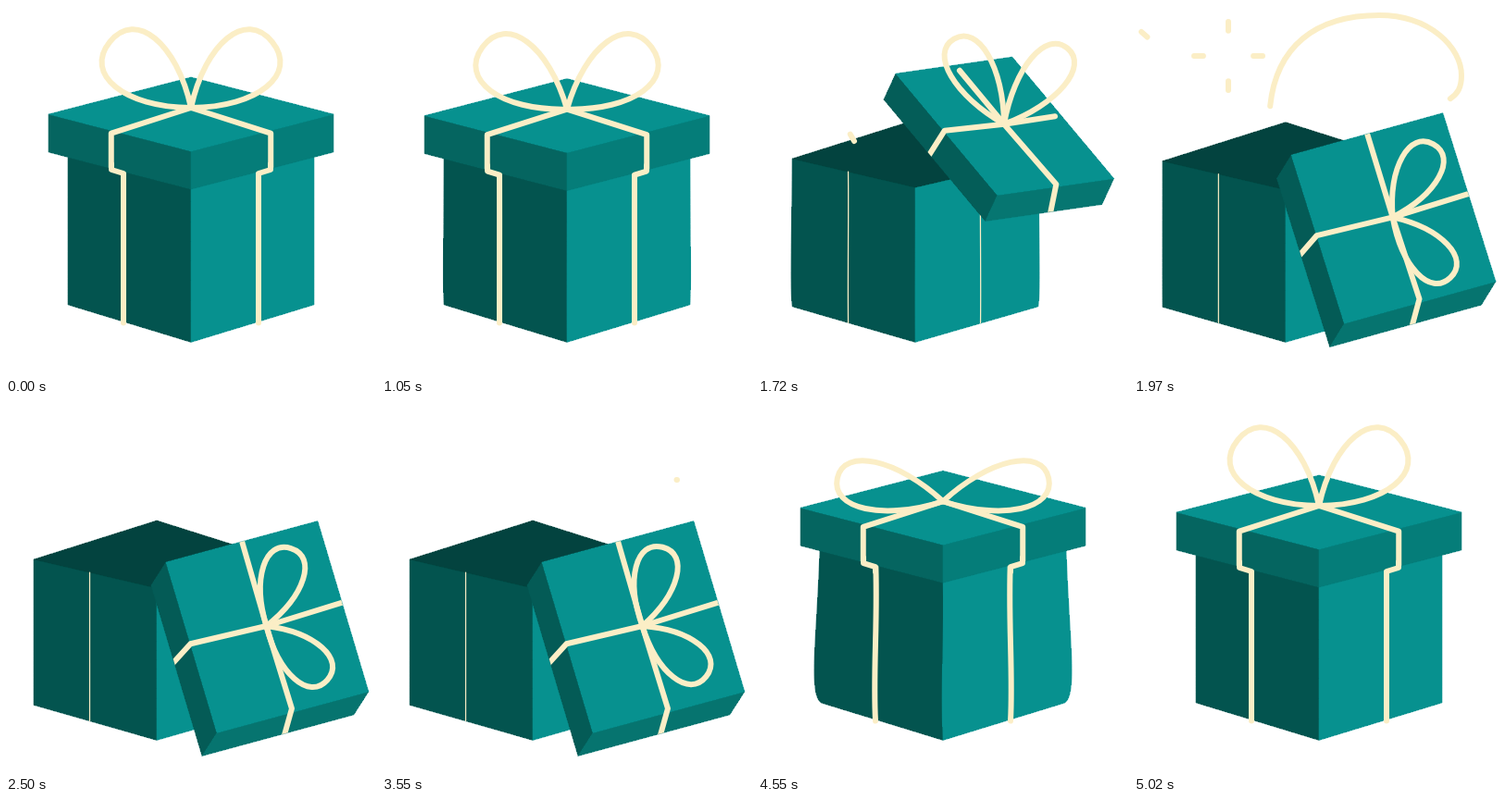
Write an HTML page that moves like this. It is 400x400 px and loops after 5.05 s.

```html
<!DOCTYPE html>
<html lang="en">
<head>
<meta charset="utf-8">
<title>Gift box</title>
<style>
html, body { margin: 0; width: 100%; height: 100%; overflow: hidden; background: #fff; }
svg { display: block; width: 100vw; height: 100vh; }
.line { fill: none; stroke: #fbeec6; stroke-width: 6; stroke-linecap: round; stroke-linejoin: round; }
.face { stroke-width: .6; stroke-linejoin: round; shape-rendering: crispEdges; }
</style>
</head>
<body>
<svg id="stage" viewBox="0 0 400 400">
  <defs><clipPath id="lidClip"><path id="lidShape"/></clipPath></defs>
</svg>
<script>
const LOOP = 5050, MIRROR = 6020;
const WINDUP = 1020, LAUNCH = 1525;
const stage = document.getElementById('stage');
const lidShape = document.getElementById('lidShape');

function add(cls, attrs = {}) {
  const el = document.createElementNS('http://www.w3.org/2000/svg', 'path');
  el.setAttribute('class', cls);
  for (const k in attrs) el.setAttribute(k, attrs[k]);
  stage.append(el);
  return el;
}
const face = color => {
  const el = add('face');
  paint(el, color);
  return el;
};
const paint = (el, color) => { el.style.fill = el.style.stroke = color; };
const draw = (el, d) => el.setAttribute('d', d);
const show = (el, on) => el.setAttribute('visibility', on ? 'visible' : 'hidden');
const open = (...pts) => 'M' + pts.join('L');
const poly = (...pts) => open(...pts) + 'Z';

const lerp = (a, b, k) => a + (b - a) * k;
const mix = (a, b, k) => a.map((v, i) => lerp(v, b[i], k));
const plus = (a, b) => a.map((v, i) => v + b[i]);
const minus = (a, b) => a.map((v, i) => v - b[i]);
const rgb = c => `rgb(${c.map(Math.round)})`;

const span = (t, a, b) => Math.min(1, Math.max(0, (t - a) / (b - a)));
const ease = (t, a, b) => (1 - Math.cos(Math.PI * span(t, a, b))) / 2;
// Rises from 0 at `from` towards 1; a higher power starts more slowly.
const settle = (t, from, tau, power = 1) =>
  1 - Math.exp(-((Math.max(0, t - from) / tau) ** power));

const bodyL = face('#03544f'), bodyR = face('#07918f'), inside = face('#03433f');
const bandL = add('line'), bandR = add('line');
const spark = add('line', { d: 'M104 146C75 95 45 60 8 28', pathLength: 1 });
const swirl = add('line', {
  d: 'M148 186C143 160 143 130 147 110C153 45 195 10 265 10C320 10 354 45 354 75' +
     'C354 90 349 96 339 102C325 110 308 105 308 93C308 85 313 82 319 82',
  pathLength: 1
});
const ring = add('line'), burst = add('line');
const lidL = face('#056560'), lidR = face('#057d79'), lidTop = face('#07918f');
const cross = add('line', { 'clip-path': 'url(#lidClip)' });
const joinL = add('line'), joinR = add('line');
const bowL = add('line'), bowR = add('line');

// Everything that drives the pose at time t.
function motion(t) {
  const wind = span(t, WINDUP, LAUNCH);
  const slide = settle(t, LAUNCH, 118);
  return {
    slide,
    bob: 5.5 * Math.sin(1.5 * Math.PI * wind),
    bulge: Math.sin(Math.PI / 2 * wind) * (1 - slide),
    slim: settle(t, LAUNCH, 45),
    turn: settle(t, LAUNCH, 237, 2.45),
    fall: settle(t, LAUNCH, 311, 2.45),
    hop: 20 * Math.sin(Math.PI * span(t, LAUNCH, 1820))
  };
}

function drawBody({ slide, bob, bulge, slim }) {
  const dx = -37 * slide, rim = (bob - 10) * (1 - slide);
  const left = 67 + dx, mid = 200 + dx, right = 333 + dx;
  const rimL = [left, 168 + rim], rimM = [mid, 199 + rim], rimR = [right, 168 + rim];
  const base = 323 + 2.5 * slide, foot = [mid, 363.5];
  const seam = `C${mid - 3 * bulge} 300 ${mid + 2 * bulge} 250 ${rimM}`;
  const wall = (x, out, top) =>
    `M${top}C${x + out * 3 * bulge} 250 ${x + out * 13 * bulge} 312 ` +
    `${x - out * bulge} ${base}L${foot}${seam}Z`;
  draw(bodyL, wall(left, -1, rimL));
  draw(bodyR, wall(right, 1, rimR));
  draw(inside, poly(rimL, [mid, 126 + rim], rimR, rimM));

  const top = 182 + rim, bend = 3 * bulge;
  const band = (el, x, out) => {
    draw(el, `M${x} ${top}C${x - out * bend} 230 ${x + out * bend} 290 ${x} 342.5`);
    el.style.strokeWidth = lerp(6, 1.2, slim);
  };
  band(bandL, 127 + dx + .5 * slim, -1);
  band(bandR, 273 + dx - 2.5 * slim, 1);
}

// A teardrop loop that starts and ends at the knot.
function drawLoop(el, knot, degrees, length, width) {
  const a = degrees * Math.PI / 180, c = Math.cos(a), s = Math.sin(a);
  const at = (x, y) => plus(knot, [x * c - y * s, x * s + y * c]);
  draw(el, `M${knot}C${at(length / 2, -width)} ${at(length, -width)} ${at(length, 0)}` +
    `C${at(length, width)} ${at(length / 2, width)} ${knot}`);
}

function drawBow(t, knot, { slide, bulge, fall }) {
  const since = Math.max(0, t - LAUNCH);
  const swing = -30 * fall * Math.exp(-since / 900) * Math.sin(2 * Math.PI * since / 630);
  const axis = -90 + 71.5 * settle(t, LAUNCH, 333, 3.4) + swing;
  const spread = 51 + 27 * bulge + 6 * slide - 44 * slide * (1 - fall);
  const length = 113 + 4 * bulge - 25 * fall;
  const width = 45 - 11 * bulge - 15 * slide;
  drawLoop(bowL, knot, axis - spread, length, width);
  drawLoop(bowR, knot, axis + spread, length, width);
}

function drawLid(t, m) {
  const { slide, bob, turn, fall, hop } = m;
  const centre = [200 + 82.5 * slide, 117 + bob + 129.5 * fall - hop];
  const across = mix([154, 0], [109.5, 70], slide);
  const down = [-54.5 * turn ** 2.5, 40 + 74.5 * turn];
  const side = mix([0, 41], [-16, 25], slide);
  const L = minus(centre, across), R = plus(centre, across);
  const B = minus(centre, down), F = plus(centre, down);
  const low = a => plus(a, side);
  draw(lidTop, poly(L, B, R, F));
  draw(lidL, poly(L, F, low(F), low(L)));
  draw(lidR, poly(F, R, low(R), low(F)));
  draw(lidShape, poly(L, B, R, low(R), low(F), low(L)));
  paint(lidL, rgb(mix([5, 101, 96], [4, 91, 86], slide)));
  paint(lidR, rgb(mix([5, 125, 121], [6, 116, 111], slide)));

  const knot = plus(centre, [-slide, lerp(-7, -1, slide)]);
  const split = lerp(.56, .5, slide);
  const shift = a => plus(a, [-slide, lerp(3, -4, slide)]);
  const mL = shift(mix(F, L, split)), mR = shift(mix(F, R, split));
  const endL = plus(mL, plus(side, [-4 * slide, -3 * slide]));
  const endR = plus(mR, plus(side, [9 * slide, 0]));
  const past = (a, b) => plus(b, minus(b, a));
  const rear = a => mix(knot, shift(a), slide * 1.08);
  draw(cross, open(past(mL, endL), mL, knot, mR, past(mR, endR)) +
    open(rear(mix(L, B, .5)), knot, rear(mix(B, R, .5))));

  const y = L[1] + 60;
  [[joinL, -1], [joinR, 1]].forEach(([el, out]) => {
    const [x1, x2] = [200 + 86 * out, 200 + 73 * out];
    show(el, t < LAUNCH + 15);
    draw(el, open([x1, y - 6], [x1, y], [x2, y + 4], [x2, y + 9]));
  });
  drawBow(t, knot, m);
}

function trim(el, tail, head, on) {
  show(el, on);
  const start = Math.min(tail, .999);
  el.setAttribute('stroke-dasharray', `${Math.max(head - start, .001)} 2`);
  el.setAttribute('stroke-dashoffset', -start);
}

function drawSparks(t) {
  trim(spark, ease(t, 1750, 2010), ease(t, 1700, 1840), t > 1700 && t < 2150);
  trim(swirl, settle(t, 1820, 275, 2.8), ease(t, 1745, 2040), t > 1745 && t < 2490);

  const grow = span(t, 1740, 1900), r = 22 * grow;
  show(ring, grow > 0 && grow < 1);
  draw(ring, `M${102 - r} 54a${r} ${r} 0 1 1 ${2 * r} 0a${r} ${r} 0 1 1 ${-2 * r} 0`);
  ring.style.strokeWidth = 6 * Math.sin(Math.PI * grow);

  const near = 17 + 20 * ease(t, 1860, 2080), far = 18 + 19 * ease(t, 1860, 1960);
  show(burst, t > 1880 && t < 2130);
  draw(burst, [[1, 0], [0, 1], [-1, 0], [0, -1]].map(([x, y]) =>
    open([102 + x * near, 54 + y * near], [102 + x * far, 54 + y * far])).join(''));
}

function render(now) {
  const loop = now % LOOP;
  const t = Math.min(loop, MIRROR - loop);  // opens, rests, then closes in reverse
  const m = motion(t);
  drawBody(m);
  drawSparks(t);
  drawLid(t, m);
}

const start = performance.now();
function tick() {
  render(performance.now() - start);
  requestAnimationFrame(tick);
}
tick();
</script>
</body>
</html>
```
